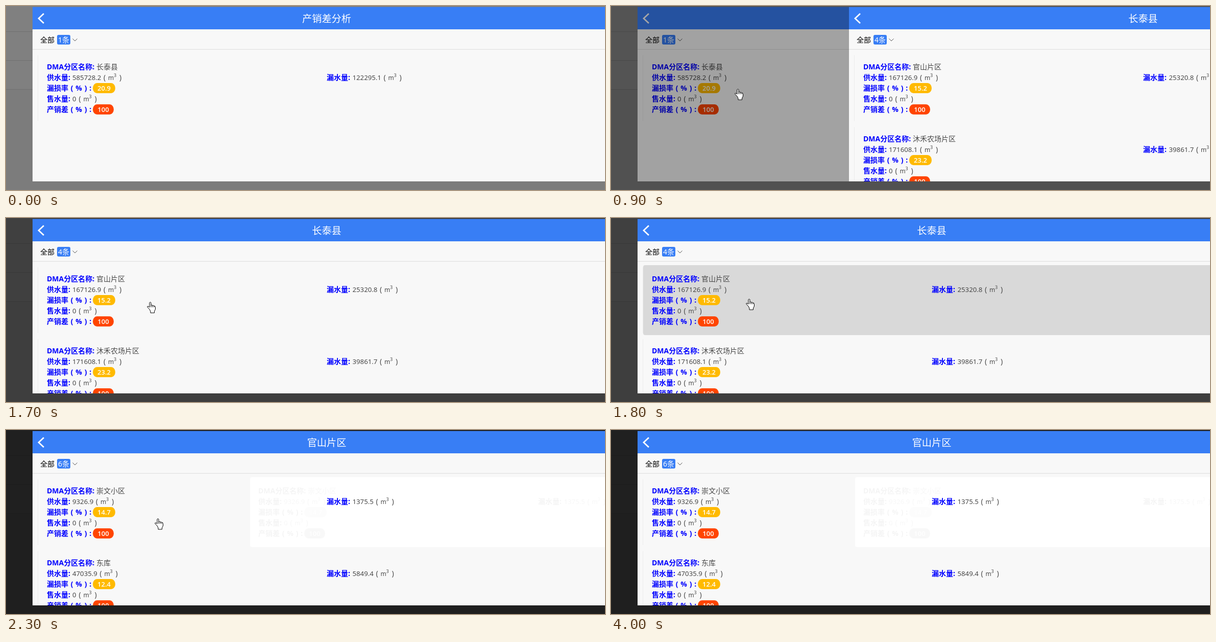
Animation of 1173x363 px, one loop 4100 ms. Source, as an HTML page:

```html
<!DOCTYPE html>
<html lang="zh-CN">
<head>
<meta charset="utf-8">
<title>产销差分析</title>
<style>
  html, body { margin: 0; width: 100%; height: 100%; overflow: hidden; background: #808080; }
  svg { display: block; width: 1173px; height: 363px; }
  text { font: 14px "Noto Sans", "Noto Sans CJK SC", sans-serif; fill: #484848; white-space: pre; }
  .label { font-weight: bold; fill: #00f; }
  .num { font-size: 13.2px; }
  .unit { font-size: 12px; }
  .sup { font-size: 9px; }
  .pill { font: 600 13px "Open Sans", "Noto Sans", sans-serif; fill: #fff; text-anchor: middle; }
  .title { font-size: 19.2px; fill: #fff; text-anchor: middle; }
  .dark { fill: #000; }
  .white { fill: #fff; }
</style>
</head>
<body>
<svg id="stage" viewBox="0 0 1173 363" xmlns="http://www.w3.org/2000/svg"></svg>
<script>
const LOOP = 4100, STEP = 100;
const W = 1173, H = 363, LEFT = 52, TOP = 2, BOTTOM = 346;
const CARD_TOP = 93, CARD_GAP = 142, ROW = 21;
const stage = document.getElementById('stage');

const rect = (x, y, w, h, fill, more = '') =>
  `<rect x="${x}" y="${y}" width="${w}" height="${h}" fill="${fill}" ${more}/>`;
const text = (x, y, cls, s) => `<text x="${x}" y="${y}" class="${cls}">${s}</text>`;
const line = (d, color, width) =>
  `<path d="${d}" fill="none" stroke="${color}" stroke-width="${width}"/>`;

// Brackets sit in the middle of a full-width cell
const percent = s => s +
  ['(', '%', ')', ':'].map(c => `<tspan dx="4.8">${c}</tspan>`).join('');

// A number followed by its cubic metre unit
function volume(x, y, value) {
  const digits = value.replace('.', '').length;
  const end = x + digits * 7.55 + (value.includes('.') ? 3.2 : 0);
  return text(x, y, 'num', value) + text(end + 5, y, '', '(') + text(end + 14, y, 'unit', 'm') +
    text(end + 25, y - 6, 'sup', '3') + text(end + 36, y, '', ')');
}

function pill(y, w, fill, value) {
  return rect(170, y, w, 20, fill, 'rx="8" ry="10"') + text(170 + w / 2, y + 15, 'pill', value);
}

function card(top, [name, supply, leak, rate]) {
  const row = i => top + 32 + ROW * i;
  const labels = ['DMA分区名称:', '供水量:', percent('漏损率'), '售水量:', percent('产销差')];
  return line(`M62.5 ${top + 4}v130`, '#ececec', 1) +
    labels.map((s, i) => text(80, row(i), 'label', s)).join('') +
    text(177, row(0), '', name) +
    volume(130, row(1), supply) +
    text(628, row(1), 'label', '漏水量:') + volume(678.5, row(1), leak) +
    pill(row(2) - 15, 44, '#ffba00', rate) +
    volume(130, row(3), '0') +
    pill(row(4) - 15, 41, '#ff4500', '100');
}

function page(id, title, count, cards, backdrop = '') {
  return `<g id="page${id}"><g clip-path="url(#frame)">` +
    rect(LEFT, TOP, W, H, '#f8f8f8') +
    rect(LEFT, TOP, W, 44, '#387ef5') +
    line('M74 15L64 24.5L74 34', '#fff', 2.8) +
    text(628, 32, 'title', title) +
    rect(LEFT, 85, W, 1, '#ddd') +
    text(67, 72, 'dark', '全部') +
    rect(100, 57, 26, 19, '#387ef5', 'rx="3"') +
    text(102, 72, 'white', count + '条') +
    line('M130.5 64.5L135 69L139.5 64.5', '#555', 1) +
    backdrop +
    rect(63, CARD_TOP, W, 138, '#d9d9d9', `rx="4" id="press${id}" visibility="hidden"`) +
    cards.map((c, i) => card(CARD_TOP + CARD_GAP * i, c)).join('') +
    '</g></g>';
}

const shade = id => rect(0, 0, W, H, '#000', `id="shade${id}" opacity="0"`);

const SLIDE = 414;
const estate = ['崇文小区', '9326.9', '1375.5', '14.7'];
const afterglow = rect(64 + SLIDE, CARD_TOP, W, 138, '#fff', 'rx="4"') +
  `<g transform="translate(${SLIDE} 0)" opacity=".04" style="filter:grayscale(1)">` +
  card(CARD_TOP, estate) + '</g>';

const hand = 'M5 15L2 12Q0 10 1 9.2Q3 8.5 5 11V2Q6.5 -.5 8 2V7Q10 5.8 11 7.5Q13 6.8 14 8.5' +
  'Q16.3 8 16.5 10.5V15L14.5 19V22H7V19Z';
const arrow = 'M.5 .5V16L4 12.6L6.5 18.5L9 17.4L6.6 11.7H11.5Z';

stage.innerHTML =
  `<defs><clipPath id="frame">${rect(LEFT, TOP, W, BOTTOM - TOP, '#000')}</clipPath></defs>` +
  rect(0, 0, W, H, '#808080') + rect(0, 165, W, H, '#7c7c7c') +
  [0, 1, 2].map(i => rect(0, 50 + 57 * i, W, 1, '#707070')).join('') +
  page(0, '产销差分析', 1, [['长泰县', '585728.2', '122295.1', '20.9']]) +
  shade(1) +
  page(1, '长泰县', 4, [
    ['官山片区', '167126.9', '25320.8', '15.2'],
    ['沐禾农场片区', '171608.1', '39861.7', '23.2']]) +
  shade(2) +
  page(2, '官山片区', 6, [estate, ['东库', '47035.9', '5849.4', '12.4']], afterglow) +
  `<g id="cursor" stroke="#000" fill="#fff" stroke-linejoin="round">
    <g id="hand"><path d="${hand}"/><path d="M8 7V11M11 7.5V11M14 8.5V11" fill="none"/></g>
    <path id="arrow" d="${arrow}"/>
  </g>`;

const el = id => document.getElementById(id);
const show = (id, on) => el(id).setAttribute('visibility', on ? 'visible' : 'hidden');

// The mouse rests at each point until it sets off for the next
const moves = [
  { from: 100, to: 600, x: 242, y: 163 },
  { from: 1100, to: 1400, x: 456, y: 257 },
  { from: 1400, to: 1800, x: 264, y: 159 },
  { from: 2000, to: 2300, x: 291, y: 174 },
  { from: 2300, to: 2500, x: 459, y: 176 },
  { from: 2500, to: 3300, x: 60, y: 18 },
  { from: 3600, to: 3900, x: 978, y: 74 }
];

function cursorAt(t) {
  if (t < moves[0].from || t > moves[moves.length - 1].to) return null;
  let x = 1141, y = 101;
  for (const m of moves) {
    const k = Math.min(1, Math.max(0, (t - m.from) / (m.to - m.from)));
    const ease = 1 - (1 - k) ** 2;
    x += (m.x - x) * ease;
    y += (m.y - y) * ease;
  }
  return { x, y };
}

// The next page glides in from the right while everything below it dims
function slide(id, t) {
  const n = t / STEP;
  const x = n >= 2 ? 0 : SLIDE * 0.145 ** n;
  show('page' + id, t >= 0);
  el('page' + id).setAttribute('transform', `translate(${x} 0)`);
  el('shade' + id).setAttribute('opacity', t < 0 ? 0 : Math.min(0.5, 0.35 + 0.12 * n));
}

function draw(now) {
  const t = Math.floor((now % LOOP) / STEP) * STEP;
  show('press0', t >= 700 && t < 900);
  show('press1', t >= 1800 && t < 2000);
  slide(1, t - 900);
  slide(2, t - 2000);

  const p = cursorAt(t);
  const overBack = p && p.x < 75 && p.y < 46;
  const pointing = p && (p.y >= CARD_TOP || overBack);
  show('hand', pointing);
  show('arrow', p && !pointing);
  if (p) el('cursor').setAttribute('transform', `translate(${p.x} ${p.y})`);
}

const start = performance.now();
function tick() {
  draw(performance.now() - start);
  requestAnimationFrame(tick);
}
tick();
</script>
</body>
</html>
```
